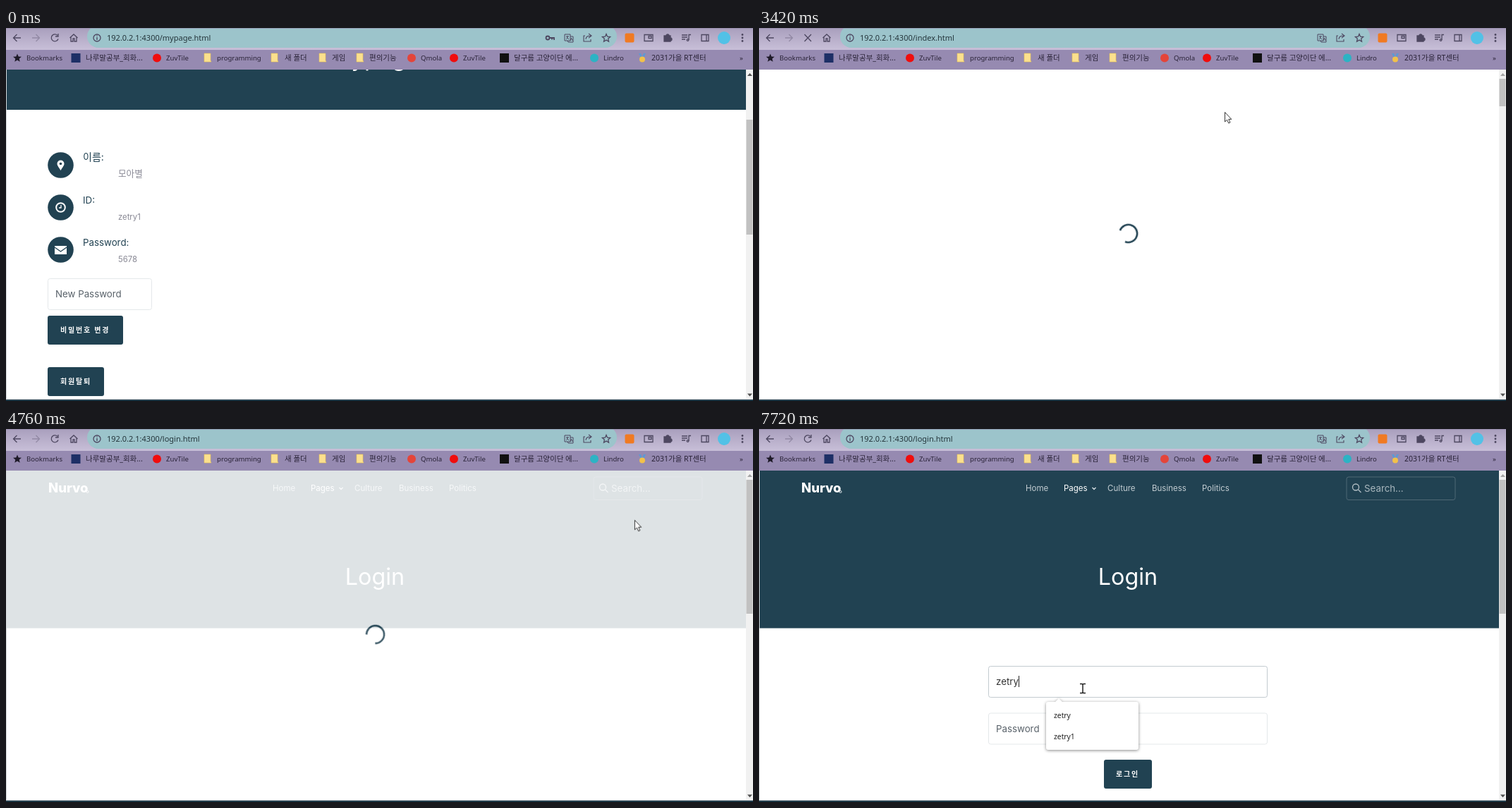
Animation, 1059 px wide and 529 px high, one loop 8000 ms. Source, as an HTML page:

```html
<!DOCTYPE html>
<html lang="ko">
<head>
<meta charset="utf-8">
<title>Account page</title>
<style>
html, body { margin: 0; width: 100%; height: 100%; overflow: hidden; background: #fff; }
svg { display: block; width: 1059px; height: 529px; }
text { font-family: Inter, "Noto Sans CJK KR", "Noto Sans CJK", sans-serif; white-space: pre; }
.ui, .ui text { font-family: "Noto Sans", "Noto Sans CJK KR", "Noto Sans CJK", sans-serif; }
.mark { font-size: 9.6px; fill: #2a2338; }
.ko { font-size: 10.5px; }
.url { font-size: 11px; fill: #25363c; }
.icon { fill: none; stroke: #4d4760; stroke-width: 1.3; }
.label { font-size: 13.3px; fill: #214252; }
.value { font-size: 11.3px; fill: #888894; }
.field { font-size: 13.3px; fill: #59626a; }
.box { fill: #fff; stroke: #e4e8ea; }
.dark { fill: #214252; }
.btn { font-size: 10px; font-weight: 700; letter-spacing: 1.8px; fill: #fff; }
.en { font-size: 9.2px; letter-spacing: 1.7px; }
.nav { font-size: 11.5px; fill: #c3cdd2; }
.logo { font-size: 18.5px; font-weight: 800; fill: #fff; }
.poi { font-size: 10px; font-weight: 500; paint-order: stroke; stroke: #fff; stroke-width: 2px; text-anchor: middle; }
.num { font-size: 8.6px; fill: #5c5348; text-anchor: middle; }
.road { fill: none; stroke: #fff; stroke-linejoin: round; }
.card { fill: #fff; filter: drop-shadow(0 1px 2px #0007); }

/* hard switches over the 8 s loop */
.sw { animation: 8s step-end infinite; }
@keyframes mypage { 0% { visibility: visible } 39.75% { visibility: hidden } }
@keyframes index { 0% { visibility: hidden } 39.75% { visibility: visible } 55.25% { visibility: hidden } }
@keyframes login { 0% { visibility: hidden } 55.25% { visibility: visible } }
@keyframes loaded { 0% { visibility: hidden } 59.5% { visibility: visible } }
@keyframes reload { 0%, 45%, 59.5% { visibility: visible } 34.125%, 51.5% { visibility: hidden } }
@keyframes stop { 0%, 45%, 59.5% { visibility: hidden } 34.125%, 51.5% { visibility: visible } }
@keyframes ring { 0%, 25.6% { visibility: hidden } 15.375% { visibility: visible } }
@keyframes confirm { 0%, 36% { visibility: hidden } 18.75% { visibility: visible } }
@keyframes notice { 0%, 37.875% { visibility: hidden } 36% { visibility: visible } }
@keyframes focus { 0% { visibility: hidden } 71% { visibility: visible } }
@keyframes three { 0%, 76% { visibility: hidden } 74.75% { visibility: visible } }
@keyframes two { 0% { visibility: hidden } 76% { visibility: visible } }
@keyframes arrow { 0%, 12.6%, 46.2%, 64% { visibility: hidden } .875%, 21.2%, 53.4% { visibility: visible } }
@keyframes hand { 0%, 21.2%, 53.4% { visibility: hidden } 12.6%, 46.2% { visibility: visible } }
@keyframes beam { 0% { visibility: hidden } 64% { visibility: visible } }

/* motion */
#loader { animation: loader 8s linear infinite; }
@keyframes loader {
  0%, 39.74%, 46%, 55.24%, 62.5%, 100% { opacity: 0 }
  39.75%, 43.75%, 55.25%, 59% { opacity: 1 }
}
#spinner { animation: spin 8s linear infinite; transform-origin: 523.5px 291.5px; }
@keyframes spin {
  0%, 39.75% { transform: rotate(40deg) } 46.25% { transform: rotate(290deg) }
  55.25% { transform: rotate(-28deg) } 62.5%, 100% { transform: rotate(250deg) }
}
#form { animation: rise 8s ease infinite; }
@keyframes rise {
  0%, 60.2% { transform: translateY(90px); opacity: 0 }
  67.9%, 100% { transform: none; opacity: 1 }
}
#cursor { animation: travel 8s ease-in-out infinite; }
@keyframes travel {
  0%, .875% { transform: translate(150px, 473px) }
  4.75%, 6.625% { transform: translate(1px, 414px) }
  13.5%, 21% { transform: translate(67px, 500px) }
  31%, 33% { transform: translate(612px, 106px) }
  34.125%, 43.4% { transform: translate(660px, 119px) }
  46.6% { transform: translate(970px, 110px) }
  47.6% { transform: translate(948px, 97px) }
  48.4%, 57.75% { transform: translate(950px, 96px) }
  65%, 82.75% { transform: translate(465px, 365px) }
  84.9%, 100% { transform: translate(459px, 368px) }
}
</style>
</head>
<body>
<svg viewBox="0 0 1059 529">
<defs>
  <linearGradient id="bar" x2="0" y2="1"><stop stop-color="#a99fbd"/><stop offset="1" stop-color="#c8bfd8"/></linearGradient>
  <clipPath id="mapClip"><path d="M59 289.500H987.500V527H59z"/></clipPath>
  <clipPath id="page"><path d="M0 59H1049V527H0z"/></clipPath>
  <path id="folder" d="M-5-6H4V4l1 2H-5z" fill="#fbe08e" stroke="#e5bf5a" stroke-width=".6"/>
  <g id="translate" class="icon"><path d="M-6-5H2V4H-6zM2-2H6V6H-1L-2 4M-4-2H0M-2-3C-2 0-3 2-4 2M-3-1L0 2M2 4L3.500 0 5 4" stroke-width="1"/></g>
  <g id="nav" class="nav">
    <text class="logo" x="60" y="114">Nurvo</text>
    <circle cx="115.500" cy="113" r="1.500" fill="none" stroke="#dfe6ea"/>
    <text x="378" y="112" style="fill:var(--home)">Home</text>
    <g style="fill:var(--pages)"><text x="432" y="112">Pages</text><path d="M472.500 107l2.500 2.500 2.500-2.500" fill="none" stroke="#dfe6ea" stroke-width="1.300"/></g>
    <text x="494" y="112">Culture</text><text x="557" y="112">Business</text><text x="628" y="112">Politics</text>
  </g>
  <path id="house" d="M-9-3l5-5 5 5 4-3 6 6-5 5-5-4-3 3z" fill="#fffdf9" stroke="#ddd2c0" stroke-width=".7"/>
</defs>

<!-- browser bars -->
<g class="ui">
  <path fill="url(#bar)" d="M0 0H1059V31H0z"/>
  <path fill="#968ab1" d="M0 31H1059V59H0z"/>
  <rect x="115" y="-4" width="751" height="32" rx="16" fill="#9cc4cb"/>
  <path d="M0 .5H1059" stroke="#8a80a0" opacity=".6"/>
  <g class="icon">
    <path d="M21 14H11M15.500 9l-5 5 5 5"/>
    <path d="M37 14H47M42.500 9l5 5-5 5" opacity=".35"/>
    <path class="sw" style="animation-name:reload" d="M73 10.500A5 5 0 1 0 74 15.500M74 8v4h-4"/>
    <path class="sw" style="animation-name:stop" d="M64.500 9l9.500 10M74 9l-9.500 10"/>
    <path d="M90.500 14l5.500-5 5.500 5M92 13v6h3v-4h2v4h3v-6"/>
    <circle cx="129" cy="14" r="5"/><path d="M129 13v4M129 10.500v1.200"/>
    <path d="M821 11h-2v8h10v-3M822 16c0-4 3-5 7-5M826 8l4 3-4 3" stroke-width="1.100"/>
    <path d="M851 8.500l1.600 3.700 4 .3-3 2.700.9 4-3.500-2.100-3.500 2.100.9-4-3-2.700 4-.3z"/>
    <path d="M905 9.500h12v9h-12zM911 11.500h4v3h-4z"/>
    <path d="M933 11h3a2 2 0 0 1 4 0h2v3a2 2 0 0 1 0 4v1h-9z" fill="#4d4760"/>
    <path d="M958 10h8M958 13h8M958 16h5M968 17V9.500h3"/><circle cx="966.500" cy="17" r="1.300"/>
    <path d="M986 9.500h10v9h-10zM993 9.500v9h3v-9z"/>
  </g>
  <rect x="877.500" y="7.500" width="13" height="13" rx="2" fill="#f07a22"/>
  <circle cx="1018" cy="14" r="9" fill="#52c1e6"/>
  <g fill="#4d4760"><circle cx="1044" cy="9.500" r="1.400"/><circle cx="1044" cy="14" r="1.400"/><circle cx="1044" cy="18.500" r="1.400"/></g>
  <path d="M16 36.500l1.700 4 4.300.3-3.300 2.800 1 4.200-3.700-2.300-3.700 2.300 1-4.200-3.300-2.800 4.300-.3z" fill="#1e1a28"/>
  <rect x="92.500" y="36" width="13" height="13" fill="#1d2f66"/>
  <circle cx="214" cy="42.500" r="6" fill="#f00d0d"/><circle cx="635" cy="42.500" r="6" fill="#f00d0d"/>
  <circle cx="575" cy="42.500" r="6" fill="#e4453a"/>
  <rect x="700" y="36" width="13" height="13" fill="#111"/>
  <circle cx="834" cy="42.500" r="6" fill="#2cb3c4"/>
  <path d="M897 36h3l2 5 2-5h3l-3 6h-4z" fill="#5a9ad6"/><circle cx="902" cy="44.500" r="4" fill="#f2c14a"/>
  <use href="#folder" x="286" y="42"/><use href="#folder" x="381" y="42"/><use href="#folder" x="449" y="42"/><use href="#folder" x="502" y="42"/>
  <g class="mark" id="marks"></g>
</g>

<path d="M0 59H1059V527H0z" fill="#fff"/>

<!-- account page -->
<g class="sw" style="animation-name:mypage">
  <text class="ui url" x="143" y="18">192.0.2.1:4300/mypage.html</text>
  <g class="icon"><circle cx="768" cy="14" r="2.500" stroke-width="1.800"/><path d="M771 14h6v3M774 14v2.500" stroke-width="1.800"/></g>
  <use href="#translate" x="798" y="14"/>
  <g clip-path="url(#page)">
    <path class="dark" d="M0 59H1049V116H0z"/>
    <text x="523" y="54" text-anchor="middle" font-size="33" fill="#fff">Mypage</text>
  </g>
  <g class="dark"><circle cx="77.500" cy="194.500" r="18.300"/><circle cx="77.500" cy="254.500" r="18.300"/><circle cx="77.500" cy="314.500" r="18.300"/></g>
  <path d="M77.500 202c-3-5-5-7-5-9.500a5 5 0 0 1 10 0c0 2.500-2 4.500-5 9.500z" fill="#fff"/><circle cx="77.500" cy="192.500" r="1.800" class="dark"/>
  <circle cx="77.500" cy="254.500" r="6.300" fill="none" stroke="#fff" stroke-width="2"/><path d="M78 251v4h-3" fill="none" stroke="#fff" stroke-width="1.300"/>
  <path d="M69 309h17v12h-17z" fill="#fff"/><path d="M69 311l8.500 6 8.500-6" class="icon" style="stroke:#214252"/>
  <text class="label" x="109" y="188" style="font-size:14px">이름:</text><text class="value" x="159" y="211" style="font-size:12.6px">모아별</text>
  <text class="label" x="109" y="249">ID:</text><text class="value" x="159" y="272">zetry1</text>
  <text class="label" x="109" y="309">Password:</text><text class="value" x="159" y="332">5678</text>
  <rect class="box" x="59.500" y="355.500" width="147" height="44" rx="3"/>
  <text class="field" x="70" y="382">New Password</text>
  <rect class="dark" x="59" y="408" width="107" height="41" rx="3"/><text class="btn" x="77" y="432">비밀번호 변경</text>
  <rect class="sw" style="animation-name:ring" x="57" y="479" width="84" height="45" rx="5" fill="#a6b3ba"/>
  <rect class="dark" x="59" y="481" width="80" height="41" rx="3"/><text class="btn" x="77" y="505">회원탈퇴</text>
  <path d="M1049 59h10v468h-10z" fill="#f1f1f1"/><path d="M1049.500 130h9v163h-9z" fill="#c1c1c1"/>
  <path d="M1051 68l3.500-4 3.500 4z" fill="#505050"/>
</g>

<!-- home page -->
<g class="sw" style="animation-name:index">
  <text class="ui url" x="143" y="18">192.0.2.1:4300/index.html</text>
  <use href="#translate" x="798" y="14"/>
  <path d="M0 157H1049V527H0z" fill="#f8f9fb"/>
  <path class="dark" d="M0 59H1049V157.500H0z"/>
  <use href="#nav" style="--home:#fff;--pages:#c3cdd2"/>
  <text class="btn en" x="928" y="92">LOG IN</text><text class="btn en" x="923" y="133">SIGN IN</text>
  <text x="59" y="223" font-size="13.600" fill="#858c93">원하시는 곳을 입력해주세요</text>
  <rect class="box" x="59.500" y="236.500" width="849" height="44" rx="3"/>
  <text class="field" x="70" y="263">Type to search...</text>
  <rect class="dark" x="928" y="236" width="83" height="41" rx="3"/><text class="btn en" x="946" y="260">BUTTON</text>
  <g clip-path="url(#mapClip)">
    <path d="M59 289H987V527H59z" fill="#eef1ea"/>
    <path d="M59 289H305L304 335 335 410 375 527H59z" fill="#dde8f3"/>
    <path d="M308 289H584V325H308z" fill="#eaf0e6"/>
    <path d="M306 325H584V527H382L340 420z" fill="#e6eee2"/>
    <path d="M307 325H584M307 325l30 85" fill="none" stroke="#c9bfae" stroke-dasharray="3 2"/>
    <path d="M500 380V490H480C440 475 402 460 394 425 385 385 388 350 420 345 460 342 520 345 530 365z" fill="#d8d6e1"/>
    <path d="M520 378H580V490H510V400z" fill="#e2e1ea"/>
    <path d="M604 289H735V527H604z" fill="#eeeef0"/>
    <path d="M735 289H785V527H735z" fill="#dfe9d8"/>
    <path d="M870 289H987V527H843V340z" fill="#f1e7d7"/>
    <path d="M302 285C303 330 302 340 320 375S355 430 370 530" fill="none" stroke="#a9d2e4" stroke-width="8"/>
    <path d="M766 285C800 315 800 335 785 355S750 385 755 410 800 445 812 475 805 505 814 530" fill="none" stroke="#a5d2e2" stroke-width="11"/>
    <path class="road" stroke-width="7" d="M59 381H168M176 285L166 400V530M168 418H298V470H168M182 418V465M270 418V470M180 289H300"/>
    <path d="M206 420h42v14h-42zM190 436h58v25h-58zM278 420h12v12h-12zM278 440h14v20h-14zM190 500h30v27h-30zM294 504h28v23h-28z" fill="#f6f8fb" stroke="#cbd6e2" stroke-width=".7"/>
    <path class="road" stroke-width="9" d="M500 527V385Q500 374 512 374H735M727 289V527M604 488H727M560 374V350M506 493H584M843 289V527M404 447H500"/>
    <path d="M537 404h36v70h-36zM416 445h48v14h-48zM656 307h64v56h-64zM620 300h24v30h-24zM628 392h34v32h-34zM678 385h32v60h-32zM636 440h40v25h-40zM625 497h56v30h-56z" fill="#faf9f8" stroke="#d5d2d2" stroke-width=".7"/>
    <path d="M584 289h20l-1 238h-20z" fill="#fcf4c0" stroke="#e9dfae" stroke-width=".8"/>
    <path d="M583 367h20M583 382h20" stroke="#fff" stroke-width="5" stroke-dasharray="2 2"/>
    <path d="M588 491v9c0 5 6 5 6 0v-8" fill="none" stroke="#888" stroke-width="1.800"/>
    <path d="M201 297H271V392H201z" fill="#b9d8a6"/>
    <path d="M206 302H266V387H206zM206 345H266M224 302v10h24v-10M224 387v-10h24v10" fill="none" stroke="#e4f2da"/>
    <circle cx="236" cy="345" r="9" fill="none" stroke="#e4f2da"/>
    <path class="road" stroke-width="5" d="M880 289l-34 55M959 289l28 105M850 420H987M915 410l30 117"/>
    <g id="map"></g>
  </g>
  <path d="M1049 59h10v468h-10z" fill="#f1f1f1"/><path d="M1049.500 72h9v39h-9z" fill="#c1c1c1"/>
  <path d="M1051 68l3.500-4 3.500 4z" fill="#a3a3a3"/>
</g>

<!-- login page -->
<g class="sw" style="animation-name:login">
  <text class="ui url" x="143" y="18">192.0.2.1:4300/login.html</text>
  <g class="sw" style="animation-name:loaded"><use href="#translate" x="798" y="14"/></g>
  <path class="dark" d="M0 59H1049V282.500H0z"/>
  <use href="#nav" y="-24" style="--home:#c3cdd2;--pages:#fff"/>
  <rect x="833" y="68" width="154" height="32.500" rx="3" fill="none" stroke="#4f6875"/>
  <g class="icon" style="stroke:#b4c0c6"><circle cx="846" cy="82.500" r="4.500"/><path d="M849.500 86l4 4"/></g>
  <text x="858" y="89" font-size="13.300" fill="#a9b7be">Search...</text>
  <text x="523" y="221" text-anchor="middle" font-size="32.300" fill="#fff">Login</text>
  <g clip-path="url(#page)"><g id="form">
    <rect class="box" x="325.500" y="336.500" width="395" height="44" rx="3"/>
    <rect class="box" x="325.500" y="403" width="395" height="44" rx="3"/>
    <text class="field" x="336" y="430">Password</text>
    <rect class="dark" x="489" y="469" width="68" height="41" rx="3"/><text class="btn" x="506" y="493">로그인</text>
    <rect class="box sw" style="animation-name:focus;stroke:#c3cbd0" x="325.500" y="336.500" width="395" height="44" rx="3"/>
    <text class="field" id="entry" x="336" y="363">ID</text>
    <g class="sw" style="animation-name:focus"><path id="caret" d="M336.500 350v16" stroke="#222"/></g>
  </g></g>
  <g class="ui" font-size="10.300" fill="#222">
    <g class="sw" style="animation-name:three"><path class="card" d="M410 387h10l5-5 5 5h105q3 0 3 3v94q0 3-3 3H410q-3 0-3-3v-94q0-3 3-3z"/><text x="418" y="470">morune</text><text x="418" y="410">zetry</text><text x="418" y="440">zetry1</text></g>
    <g class="sw" style="animation-name:two"><path class="card" d="M410 387h10l5-5 5 5h105q3 0 3 3v62q0 3-3 3H410q-3 0-3-3v-62q0-3 3-3z"/><text x="418" y="410">zetry</text><text x="418" y="440">zetry1</text></g>
  </g>
  <path d="M1049 59h10v468h-10z" fill="#f1f1f1"/><path d="M1049.500 72h9v190h-9z" fill="#c1c1c1"/>
  <path d="M1051 68l3.500-4 3.500 4z" fill="#a3a3a3"/>
</g>

<g id="loader">
  <path d="M0 59H1049V527H0z" fill="#fff"/>
  <path id="spinner" d="M532.300 300.300A12.500 12.500 0 1 1 532.300 282.700" fill="none" stroke="#214252" stroke-width="2.700"/>
</g>
<path d="M1051 518.500l3.500 4 3.500-4z" fill="#505050"/>
<path d="M.5 59V527M0 526.500H1059" stroke="#d3d6d9"/>
<path d="M0 527H1059V529H0z" fill="#213c4a"/>

<!-- dialogs -->
<g class="ui" fill="#202124" font-size="11.600">
  <g class="sw" style="animation-name:confirm">
    <rect class="card" x="343.500" y="21.500" width="374" height="108.500" rx="3"/>
    <text x="358" y="48">192.0.2.1:4300 내용:</text><text x="358" y="72">정말 탈퇴하시겠습니까?</text>
    <rect x="588" y="90" width="53" height="27" rx="3" fill="#1a73e8"/><text x="604" y="107" font-size="10.600" fill="#fff">확인</text>
    <rect x="651.500" y="90.500" width="52" height="26" rx="3" fill="#fff" stroke="#dadce0"/><text x="668" y="107" font-size="10.600" fill="#1a73e8">취소</text>
  </g>
  <g class="sw" style="animation-name:notice">
    <rect class="card" x="343.500" y="21.500" width="374" height="108.500" rx="3"/>
    <text x="358" y="48">192.0.2.1:4300 내용:</text><text x="358" y="72">모아별님 탈퇴되었습니다.</text>
    <rect x="651" y="90" width="53" height="27" rx="3" fill="#1a73e8"/><text x="668" y="107" font-size="10.600" fill="#fff">확인</text>
  </g>
</g>

<g id="cursor" fill="#fff" stroke="#222" stroke-width=".9">
  <path class="sw" style="animation-name:arrow" d="M.5.500v13.500l3-2.800 2.300 4.800 2.200-1-2.200-4.600h4z"/>
  <path class="sw" style="animation-name:hand" d="M-1.500 9V1.500q1.500-2 3 0V6l6 1.500q1.500.5 1.300 2.500l-1 6.500H0l-4-6q.5-2.500 2.500-1z"/>
  <path class="sw" style="animation-name:beam" d="M-4-6.500h3l1 1 1-1h3M-4 6.500h3l1-1 1 1h3M0-6V6" fill="none" stroke-width="1.500"/>
</g>
</svg>

<script>
const $ = id => document.getElementById(id);

function add(parent, tag, attrs, text = '') {
  const node = document.createElementNS('http://www.w3.org/2000/svg', tag);
  for (const key in attrs) node.setAttribute(key, attrs[key]);
  node.textContent = text;
  parent.append(node);
}

const bookmarks = [
  [29, 'Bookmarks'], [113, '나루말공부_회화...'], [227, 'ZuvTile'], [299, 'programming'], [395, '새 폴더'],
  [462, '게임'], [515, '편의기능'], [588, 'Qmola'], [648, 'ZuvTile'], [720, '달구름 고양이단 에...'],
  [847, 'Lindro'], [915, '2031가을 RT센터'], [1040, '»'],
];
for (const [x, name] of bookmarks)
  add($('marks'), 'text', { x, y: 46, class: /[가-힣]/.test(name) ? 'ko' : '' }, name);

const houses = [[885, 300], [866, 329], [908, 310], [945, 309], [895, 345], [930, 339], [962, 340], [872, 366],
  [952, 367], [905, 372], [880, 434], [870, 480], [893, 448], [932, 455], [925, 500], [960, 490], [885, 508], [975, 440]];
for (const [x, y] of houses) add($('map'), 'use', { href: '#house', x, y });

const blocks = [[217, 925, 296], [201, 855, 313], [202, 887, 320], [216, 932, 325], [203, 862, 345], [215, 933, 354],
  [214, 941, 383], [204, 862, 387], [205, 894, 392], [207, 861, 457], [208, 901, 470], [212, 961, 457],
  [211, 932, 482], [209, 861, 508], [210, 971, 515]];
for (const [n, x, y] of blocks) add($('map'), 'text', { x, y, class: 'num' }, n);

const gray = '#7d7a80', ink = '#333', red = '#c0574f', blue = '#2f7fd0', tan = '#a98549', orange = '#d07a1c';
const pins = [[553, 297, gray], [553, 322, red], [668, 310, '#3d93b5'], [665, 329, gray], [652, 406, gray],
  [675, 419, gray], [702, 413, gray], [452, 458, blue], [614, 476, orange], [615, 502, gray], [219, 453, gray],
  [245, 526, gray], [915, 405, tan], [911, 512, blue], [471, 530, '#63a63d']];
for (const [cx, cy, fill] of pins) {
  add($('map'), 'circle', { cx, cy, r: 6, fill, stroke: '#fff' });
  add($('map'), 'circle', { cx, cy, r: 2.2, fill: '#fff' });
}
for (const [x, y] of [[555, 394], [522, 496]]) {
  add($('map'), 'rect', { x: x - 6, y: y - 6, width: 12, height: 12, rx: 4, fill: '#5b8fb0' });
  add($('map'), 'text', { x, y: y + 3.5, 'font-size': 9.5, 'font-weight': 700, fill: '#fff', 'text-anchor': 'middle' }, 'P');
}
for (const [x, y] of [[583, 411], [600, 411], [989, 401], [987, 418]]) {
  add($('map'), 'rect', { x: x - 7, y: y - 7, width: 14, height: 14, rx: 2, fill: '#3b8be0' });
  add($('map'), 'path', { d: `M${x - 3.5} ${y - 4}h7v7h-7zM${x - 3} ${y + 4}h1.500M${x + 1.5} ${y + 4}h1.500`, fill: 'none', stroke: '#fff', 'stroke-width': 1.3 });
}

const places = [
  [583, 296, '소람해살이'], [574, 306, '요양원'], [553, 337, '소람돌봄', red], [553, 348, '쉼터집', red],
  [702, 313, '친환경충전소'], [665, 346, '해오름빌딩'], [240, 349, '제3운동장'], [652, 396, 'QB누림은행'],
  [675, 435, '소람가락방송'], [746, 412, '온누리수목관리소'], [736, 423, '소람남부지소'],
  [551, 437, 'mirro'], [551, 447, '하늘누리셋째'], [452, 474, '하늘누리새싹들', blue], [452, 485, '어린이집', blue],
  [630, 474, '새록', orange], [644, 485, '봄나무커피', orange], [615, 518, 'Z-brook'], [615, 529, '소람지역나눔본부'],
  [219, 469, '소람미래누리터새싹'], [219, 480, '나눔마당3호관'], [915, 421, '소람푸른바람언덕단지'],
  [915, 432, '숲에머문3차아파트'], [911, 528, '공립보람솔숲마을', blue], [783, 527, '은빛3교', gray],
];
for (const [x, y, name, fill = ink] of places) add($('map'), 'text', { x, y, fill, class: 'poi' }, name);
add($('map'), 'text', { x: 0, y: 0, class: 'num', style: 'fill:#4b8fb5', transform: 'translate(367 497) rotate(75)' }, '솔내');

// typing into the ID field
const word = 'zetry', keyTimes = [6080, 6230, 6790, 7170, 7720];
let shown = -1;
function tick(now) {
  const time = now % 8000;
  const count = keyTimes.filter(k => k <= time).length;
  if (count !== shown) {
    shown = count;
    $('entry').textContent = count ? word.slice(0, count) : 'ID';
    $('entry').style.fill = count ? '#333' : '';
    const shift = count ? $('entry').getComputedTextLength() : 0;
    $('caret').setAttribute('transform', `translate(${Math.round(shift)})`);
  }
  requestAnimationFrame(tick);
}
requestAnimationFrame(tick);
</script>
</body>
</html>
```
